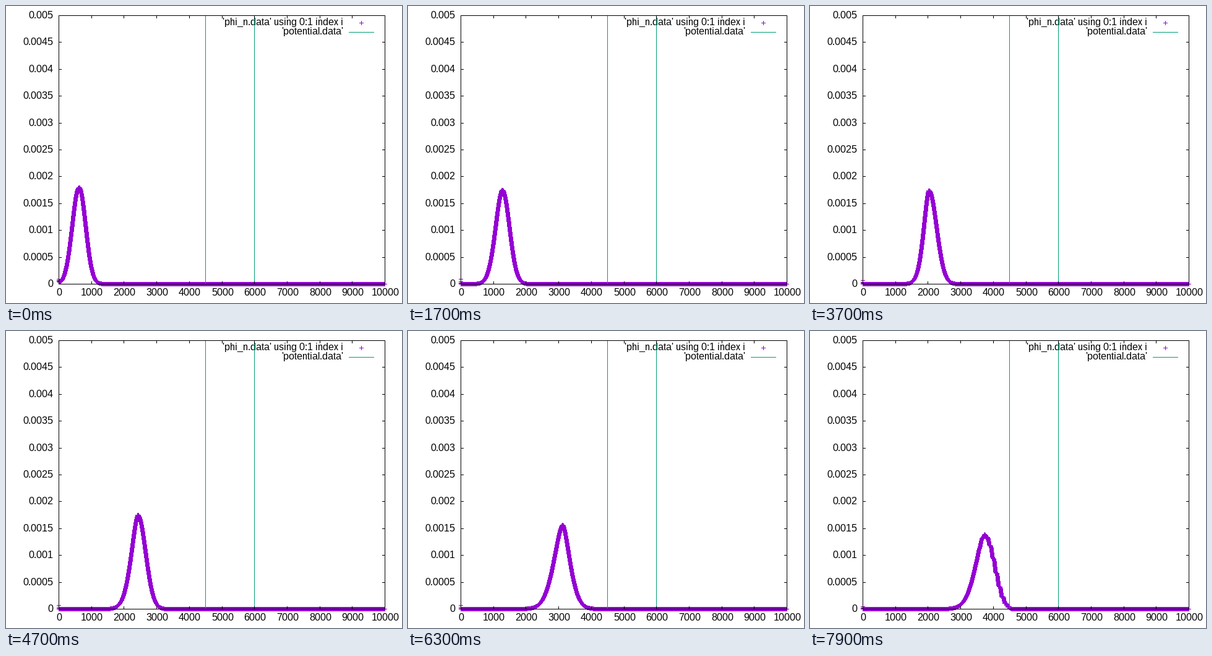
A matplotlib script that plays this animation: 640 by 480 pixels, repeating every 8 s.

```python
import numpy as np
import matplotlib.pyplot as plt
from matplotlib.animation import FuncAnimation
from matplotlib.patches import Rectangle

W, H, DPI = 640, 480, 100
LEFT, RIGHT, TOP, BOTTOM = 85, 612, 15, 449
FRAMES, STEP = 80, 100
TIC = 4
Y_MAX, X_MAX = 0.005, 10000
PURPLE, GREEN = "#9400d3", "#009e73"
PURPLE_RGBA = (148, 0, 211, 255)
X = np.arange(X_MAX)

plt.rcParams["font.family"] = "Liberation Sans"
plt.rcParams["text.hinting"] = "default"
plt.rcParams["text.hinting_factor"] = 1
fig = plt.figure(figsize=(W / DPI, H / DPI), dpi=DPI, facecolor="white")
ax = fig.add_axes([0, 0, 1, 1])
ax.axis("off")


def px(x):
    return np.floor(LEFT + np.asarray(x) * (RIGHT - LEFT) / X_MAX + 0.5).astype(int)


def py(y):
    return np.floor(BOTTOM - np.asarray(y) * (BOTTOM - TOP) / Y_MAX + 0.5).astype(int)


def bar(x0, y0, x1, y1, color="black", z=4):
    """Fill the pixels from (x0, y0) to (x1, y1), both included."""
    ax.add_patch(Rectangle((x0, y0), x1 - x0 + 1, y1 - y0 + 1,
                           color=color, lw=0, aa=False, zorder=z))


def label(x, y, s, ha):
    ax.text(x, y, s, ha=ha, va="baseline", fontsize=16 * 72 / DPI, zorder=0.5)


def ramp(t, a, b):
    u = np.clip((t - a) / (b - a), 0, 1)
    return u * u * (3 - 2 * u)


def bump(t, centre, width):
    return np.exp(-((t - centre) / width) ** 2)


def density(t):
    """Wave packet at time t in seconds: a crest with two unlike flanks."""
    crest = 620 + 392 * t - 45 * np.sin(2 * np.pi * (t / 7.9) ** 2)
    height = 180 - t - 5 * bump(t, 2.5, 1.2) - 36 * ramp(t, 4.6, 8.2)

    # half widths at half height, and how round each flank is
    squeeze, spread = bump(t, 6.3, 1), ramp(t, 6.3, 7.9)
    w_left = 246 + 62 * ramp(t, 4.2, 6.2) - 60 * bump(t, 3.8, 0.8)
    w_right = 237 + 11 * min(t, 3.7) - 25 * squeeze + 97 * spread
    p_left = 2 - 0.35 * min(t / 3.7, 1)
    p_right = 2 - 0.4 * squeeze + 0.3 * spread

    d = X - crest
    y = height * 1e-5 * np.where(d < 0,
                                 0.5 ** (np.abs(d / w_left) ** p_left),
                                 0.5 ** (np.abs(d / w_right) ** p_right))

    # reflection ripples before the barrier, decay inside it
    d = X - 4500
    ripple = 0.35 * ramp(t, 6.7, 7.9) * np.cos(2 * np.pi * d / 95)
    y *= np.where(d < 0, 1 + ripple * np.exp(np.minimum(d, 0) / 250),
                  np.exp(-np.maximum(d, 0) / 60))

    # remnant at the left wall, in pixels
    wall = (8 - 2 * ramp(t, 1.7, 4.6) - 2 * ramp(t, 6.3, 7.2)) * np.exp(-X / 1.4)
    wall += 5 * np.exp(-X / 45 - t / 0.5) * (1 - np.exp(-X / 1.4))
    return np.maximum(y, wall * Y_MAX / (BOTTOM - TOP))


def draw_plus(img, x, y):
    for k in range(-3, 4):
        img[y + k, x] = PURPLE_RGBA
        img[y, x + k] = PURPLE_RGBA


# border, tics and labels
for x in (LEFT, RIGHT):
    bar(x, TOP, x, BOTTOM)
for y in (TOP, BOTTOM):
    bar(LEFT, y, RIGHT, y)
for k in range(11):
    x, y = int(px(1000 * k)), int(py(0.0005 * k))
    bar(x, TOP, x, TOP + TIC)
    bar(x, BOTTOM - TIC, x, BOTTOM)
    bar(LEFT, y, LEFT + TIC, y)
    bar(RIGHT - TIC, y, RIGHT, y)
    label(x + 1, BOTTOM + 19, str(1000 * k), "center")
    label(76, y + 5, f"{0.0005 * k:.4g}", "right")

# key and potential
label(545, 31, "'phi_n.data' using 0:1 index i", "right")
label(545, 46, "'potential.data'", "right")
bar(571, 27, 577, 27, PURPLE)
bar(574, 24, 574, 30, PURPLE)
bar(554, 42, 594, 42, GREEN)
for wall in (4500, 6000):
    x = int(px(wall))
    bar(x, TOP, x, BOTTOM, GREEN, 3)

canvas = ax.imshow(np.zeros((H, W, 4), np.uint8), extent=(0, W, H, 0),
                   interpolation="nearest", aspect="auto", zorder=2)
ax.set_xlim(0, W)
ax.set_ylim(H, 0)


def update(n):
    img = np.zeros((H, W, 4), np.uint8)
    draw_plus(img, px(X), py(density(n * STEP / 1000)))
    canvas.set_data(img)
    return [canvas]


anim = FuncAnimation(fig, update, frames=FRAMES, interval=STEP,
                     repeat=True, repeat_delay=0)
plt.show()
```
